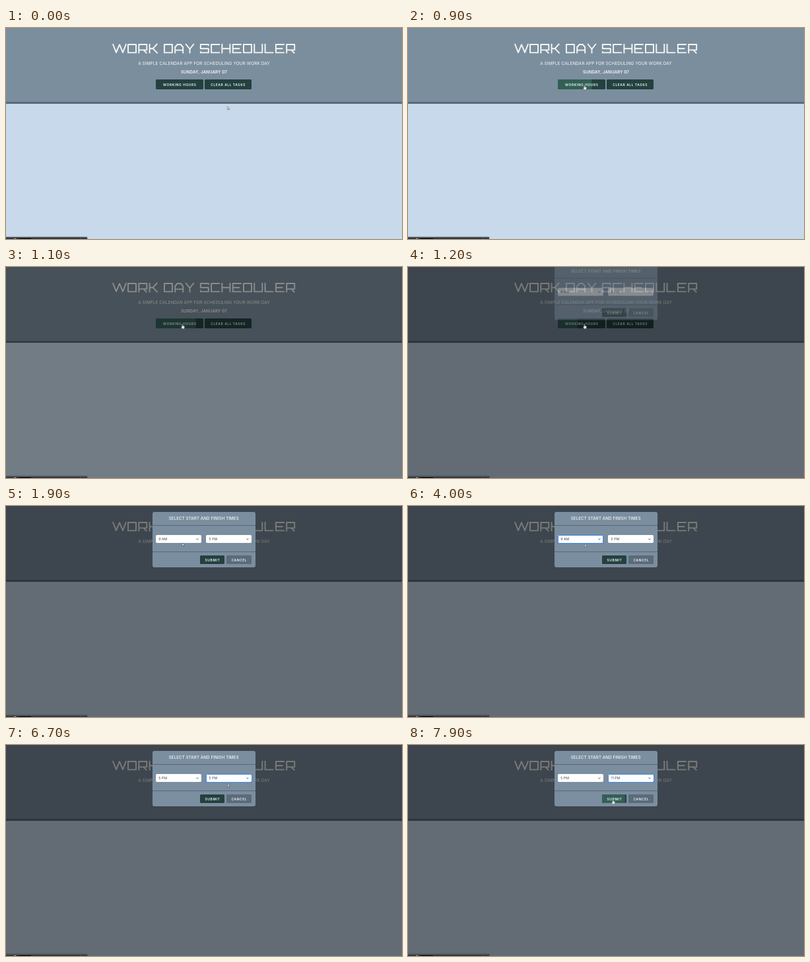
Recreate the animation shown at these times as an HTML page. Size 600x320 px, loop 8000 ms.

```html
<!DOCTYPE html>
<html lang="en">
<head>
<meta charset="utf-8">
<title>Work Day Scheduler</title>
<style>
  html, body { margin: 0; width: 100%; height: 100%; overflow: hidden; }
  body { background: #c7d9ea; font-family: Inter, "Open Sans", sans-serif; color: #f6f8f8; }
  #stage { position: relative; width: 600px; height: 320px; overflow: hidden; background: #c7d9ea; }
  #stage * { position: absolute; box-sizing: border-box; margin: 0; white-space: nowrap; }

  /* every animation shares the 8 s loop; the script sets its time */
  .anim, .fill::before, .ring::after { animation: 8s linear infinite paused; }

  header { left: 0; top: 0; width: 600px; height: 114.6px; background: #7b8e9e; border-bottom: 3px solid #5a6b7b; }
  h1 { left: 0; top: 20px; width: 600px; font: 20px/22px Inter, sans-serif; text-align: center; color: transparent; }
  #title { left: 161px; top: 23.8px; overflow: visible; fill: none; stroke: #f6f8f4; stroke-width: 1.9; stroke-linejoin: round; }
  .line { left: 0; width: 600px; height: 10px; line-height: 10px; text-align: center; }
  .sub { top: 48.5px; font-size: 6.4px; letter-spacing: .13px; }
  .date { top: 62.3px; font-size: 6.2px; font-weight: 600; letter-spacing: .12px; }

  .btn { height: 15px; border-radius: 1.5px; background: #23413f; overflow: hidden; }
  .btn span { inset: 0; display: grid; place-items: center; font-size: 4.9px; font-weight: 600; letter-spacing: .6px; text-indent: .6px; }
  .fill::before { content: ""; position: absolute; inset: 0; background: #33604f; background: #335f56; transform-origin: left; transform: scaleX(0); }
  .hours { left: 227px; top: 78px; width: 72px; }
  .clear { left: 300.6px; top: 78px; width: 71.4px; }
  .hours::before { animation-name: fillHours; }
  .clear::before { animation-name: fillClear; }
  .submit::before { animation-name: fillSubmit; }

  .backdrop { inset: 0; background: #000; opacity: 0; animation-name: dim; }
  .modal { left: 221.5px; top: 9px; width: 156.5px; height: 84px; border-radius: 3px; background: #7b8e9f; opacity: 0; animation-name: drop; }
  .modal h2 { left: 0; top: 0; width: 100%; height: 20px; font-size: 6.1px; line-height: 20px; font-weight: 500; letter-spacing: .16px; text-align: center; }
  .rule { left: 0; width: 100%; height: 1.2px; background: #56677a; }
  .select { top: 35.2px; width: 69px; height: 12.2px; border-radius: 1.8px; background: #fff; color: #3b4754; }
  .select span { left: 4.3px; top: 0; font-size: 5.2px; line-height: 12.4px; }
  .select svg { right: 4.4px; top: 4.8px; fill: none; stroke: #343a40; stroke-width: .8; }
  .ring::after { content: ""; position: absolute; inset: -.3px; border: .8px solid #4d8fdc; border-radius: 2px; box-shadow: 0 0 0 .8px rgba(60, 130, 230, .3); opacity: 0; }
  .start::after { animation-name: focusStart; animation-timing-function: step-end; }
  .finish::after { animation-name: focusFinish; animation-timing-function: step-end; }
  .start { left: 5.5px; }
  .finish { left: 81.8px; }
  .modal .btn { top: 66.3px; height: 12.7px; }
  .submit { left: 72.5px; width: 37.3px; }
  .cancel { left: 112.5px; width: 38px; background: #5b6b7a; }

  .step { animation-timing-function: step-end; }
  .start .old { animation-name: startOld; }
  .start .new { animation-name: startNew; }
  .finish .old { animation-name: finishOld; }
  .finish .new { animation-name: finishNew; }

  .dock { left: -2px; top: 317.2px; width: 124.6px; height: 5px; border-radius: 1.5px; background: #33383e; box-shadow: 0 0 1.5px #20262c; border-top: .5px solid #555b62; }
  .dock i { top: .6px; height: 4px; }
  .dock i:nth-child(1) { left: 21px; width: 19px; background: #000; }
  .dock i:nth-child(2) { left: 13.5px; top: 1.2px; width: 3.6px; border-radius: 50%; background: #e8eaec; }
  .dock i:nth-child(3) { left: 115px; width: .6px; background: #6a7076; }

  #cursor { left: 0; top: 0; width: 1px; height: 1px; overflow: visible; animation-name: move; }
  #cursor path { fill: #fff; stroke: #22282e; stroke-width: .45; }
  .arrow { animation-name: arrow; }
  .hand { animation-name: hand; }

  @keyframes dim {
    0%, 11.25% { opacity: 0; }
    12.5% { opacity: .115; }
    13.75% { opacity: .43; }
    15%, 100% { opacity: .5; }
  }
  @keyframes drop {
    0%, 13.75% { opacity: 0; transform: translateY(-20px); animation-timing-function: ease-out; }
    18.75%, 100% { opacity: 1; transform: none; }
  }
  @keyframes fillHours {
    0%, 8.1% { transform: scaleX(0); }
    12.5% { transform: scaleX(1); }
    13.75% { transform: scaleX(.84); }
    16.25%, 100% { transform: scaleX(0); }
  }
  @keyframes fillClear {
    0%, 5% { transform: scaleX(0); }
    8.1% { transform: scaleX(.75); }
    11.25%, 100% { transform: scaleX(0); }
  }
  @keyframes fillSubmit {
    0%, 95.5% { transform: scaleX(0); }
    98.75% { transform: scaleX(.94); }
    100% { transform: scaleX(1); }
  }
  @keyframes focusStart { 0% { opacity: 0; } 27.5% { opacity: 1; } 73.75%, 100% { opacity: 0; } }
  @keyframes focusFinish { 0% { opacity: 0; } 73.75%, 100% { opacity: 1; } }
  @keyframes startOld { 0% { opacity: 1; } 66.25%, 100% { opacity: 0; } }
  @keyframes startNew { 0% { opacity: 0; } 66.25%, 100% { opacity: 1; } }
  @keyframes finishOld { 0% { opacity: 1; } 93.75%, 100% { opacity: 0; } }
  @keyframes finishNew { 0% { opacity: 0; } 93.75%, 100% { opacity: 1; } }
  @keyframes arrow { 0% { opacity: 1; } 5% { opacity: 0; } 16.25% { opacity: 1; } 95%, 100% { opacity: 0; } }
  @keyframes hand { 0% { opacity: 0; } 5% { opacity: 1; } 16.25% { opacity: 0; } 95%, 100% { opacity: 1; } }
  @keyframes move {
    0%, 1.25% { transform: translate(335.5px, 118.8px); }
    3.75% { transform: translate(334px, 98px); }
    6.25% { transform: translate(322px, 87px); }
    10%, 16.25% { transform: translate(267.3px, 86.4px); animation-timing-function: ease-in-out; }
    21.25%, 33.75% { transform: translate(267px, 56px); }
    36.25%, 61.25% { transform: translate(267.7px, 57.4px); animation-timing-function: ease-in-out; }
    65%, 66.25% { transform: translate(268px, 120px); animation-timing-function: ease-in-out; }
    71.25%, 88.75% { transform: translate(335.7px, 58.7px); animation-timing-function: ease-in-out; }
    92.5%, 93.75% { transform: translate(336px, 176px); animation-timing-function: ease-in-out; }
    96.25%, 100% { transform: translate(310.4px, 82.4px); }
  }
</style>
</head>
<body>
<div id="stage">
  <header>
    <h1>WORK DAY SCHEDULER</h1>
    <svg id="title" width="278" height="15" aria-hidden="true"></svg>
    <p class="line sub">A SIMPLE CALENDAR APP FOR SCHEDULING YOUR WORK DAY</p>
    <p class="line date">SUNDAY, JANUARY 07</p>
    <div class="btn fill hours"><span>WORKING HOURS</span></div>
    <div class="btn fill clear"><span>CLEAR ALL TASKS</span></div>
  </header>

  <div class="backdrop anim"></div>

  <div class="modal anim">
    <h2>SELECT START AND FINISH TIMES</h2>
    <div class="rule" style="top:19.6px"></div>
    <div class="select ring start">
      <span class="old anim step">9 AM</span><span class="new anim step">5 PM</span>
      <svg width="4" height="3"><path d="M.4 .5L2 2.1L3.6 .5"/></svg>
    </div>
    <div class="select ring finish">
      <span class="old anim step">5 PM</span><span class="new anim step">11 PM</span>
      <svg width="4" height="3"><path d="M.4 .5L2 2.1L3.6 .5"/></svg>
    </div>
    <div class="rule" style="top:60.3px"></div>
    <div class="btn fill submit"><span>SUBMIT</span></div>
    <div class="btn cancel"><span>CANCEL</span></div>
  </div>

  <div class="dock"><i></i><i></i><i></i></div>

  <svg id="cursor" class="anim">
    <path class="arrow anim step" d="M0 0V4.7L1.1 3.8L1.9 5.4L2.7 5L1.9 3.5H3.4Z"/>
    <path class="hand anim step" d="M-.7 4V.6Q0 -.5 .7 .6V2.7L2.8 3.2Q3.4 3.5 3.3 4.5L2.7 7.2H-.4L-2.1 4.7Q-1.6 3.6 -.7 4.5Z"/>
  </svg>
</div>

<script>
  // Square display lettering, drawn as strokes in a 14 x 14.4 box
  const glyphs = {
    W: 'M.8 0L6 13.2L11 1.2L16 13.2L21.2 0',
    O: 'M1 1H13V13.4H1Z',
    R: 'M1 14.4V1H13V9.4H1M8 9.4L13 14.4',
    K: 'M1 0V14.4M1 7.2H6L12.6 0M6 7.2L13 14.4',
    D: 'M1 1H13V13.4H1Z',
    A: 'M1 14.4V5L4.5 1H9.5L13 5V14.4M1 9.6H13',
    Y: 'M.7 0L7 8L13.3 0M7 8V14.4',
    S: 'M13 3.2V1H1V7.2H13V13.4H1V11.2',
    C: 'M14 1H1V13.4H14',
    H: 'M1 0V14.4M13 0V14.4M1 7.2H13',
    E: 'M14 1H1V13.4H14M1 7.2H11.5',
    U: 'M1 0V13.4H13V0',
    L: 'M1 0V13.4H13.6'
  };
  const advance = { W: 23, ' ': 6 };
  let x = 0, letters = '';
  for (const ch of document.querySelector('h1').textContent) {
    if (glyphs[ch]) letters += `<path transform="translate(${x} 0)" d="${glyphs[ch]}"/>`;
    x += advance[ch] || 16.3;
  }
  document.getElementById('title').innerHTML = letters;

  // Advance all keyframes in ten steps per second
  const STEP = 100, LOOP = 8000;
  const anims = document.getAnimations();
  const start = performance.now();
  function tick() {
    const t = Math.floor((performance.now() - start + 20) / STEP) * STEP % LOOP;
    for (const a of anims) a.currentTime = t;
    requestAnimationFrame(tick);
  }
  tick();
</script>
</body>
</html>
```
